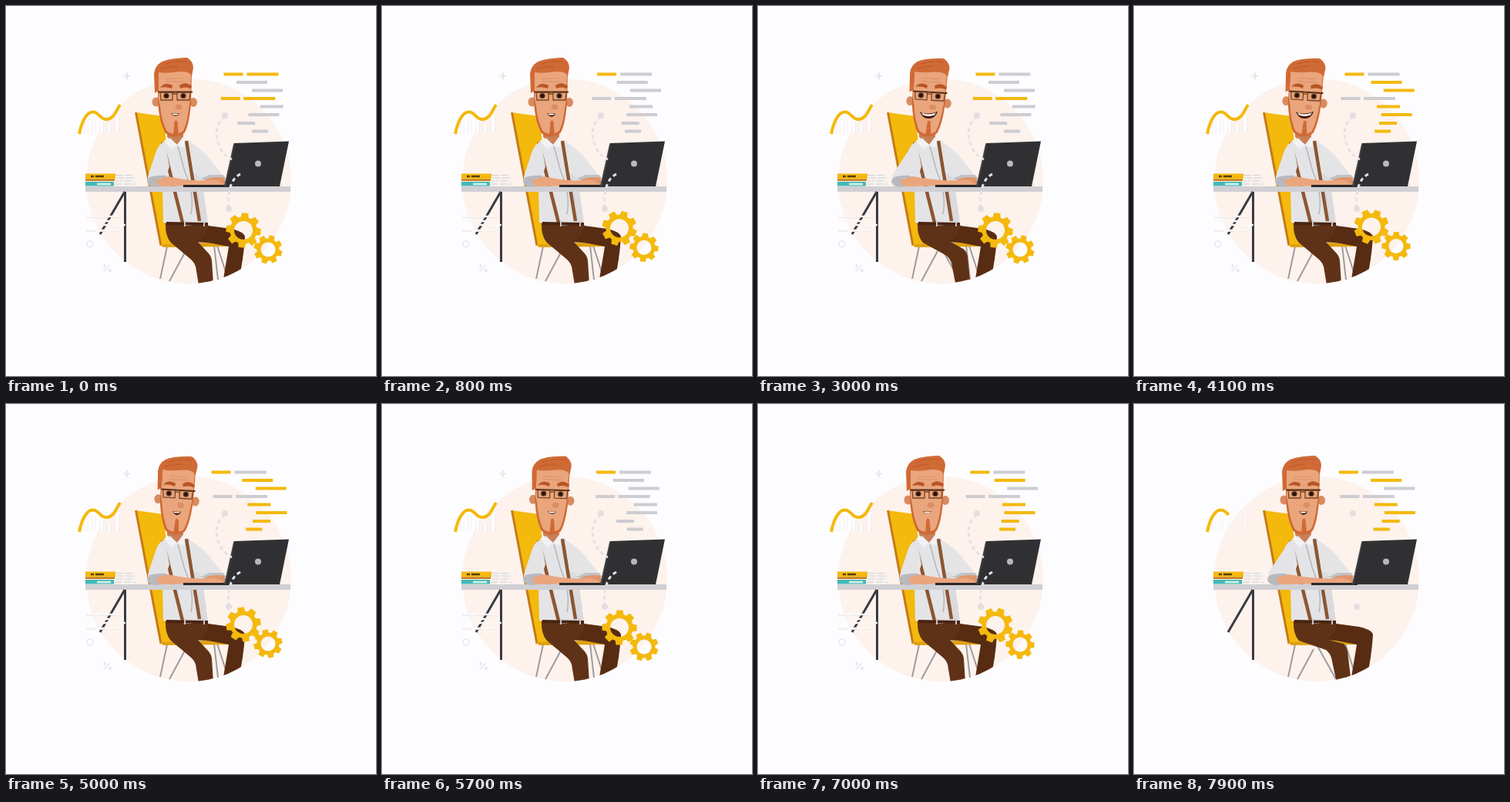
Recreate the animation shown at these times as an HTML page with a canvas. Size 480 by 480 pixels, loop 8000 ms.

```html
<!DOCTYPE html>
<html>
<head>
<meta charset="utf-8">
<style>
html, body { margin: 0; width: 100%; height: 100%; overflow: hidden; background: #fdfcff; }
canvas { display: block; }
</style>
</head>
<body>
<canvas id="stage" width="480" height="480"></canvas>
<script>
const c = document.getElementById('stage').getContext('2d');
const LOOP = 8000, CYCLE = 6000, TAU = Math.PI * 2;
const YELLOW = '#f4b90d', GRAY = '#cdccd1', SKIN = '#eaa57c', HAIR = '#d06a35',
      PANTS = '#5f3217', SHIRT = '#e4e4e7', FAINT = '#e9e6ea';

const clamp = v => Math.max(0, Math.min(1, v));
const ease = (t, a, b) => { const u = clamp((t - a) / (b - a)); return u * u * (3 - 2 * u); };

function fill(d, color) {
  c.fillStyle = color;
  c.fill(new Path2D(d));
}
function line(d, color, width, dash = []) {
  c.strokeStyle = color;
  c.lineWidth = width;
  c.setLineDash(dash);
  c.stroke(new Path2D(d));
  c.setLineDash([]);
}
function oval(x, y, rx, ry, color) {
  c.fillStyle = color;
  c.beginPath();
  c.ellipse(x, y, rx, ry, 0, 0, TAU);
  c.fill();
}
function rect(x, y, w, h, color) {
  c.fillStyle = color;
  c.fillRect(x, y, w, h);
}

// y, centre x, swing, time of the rightmost point, then pieces:
// offset, width, first colour is yellow, times of colour change
const swap = [900, 2600, 3800, 5600, 6800];
const rows = [
  [88.5, 274.8, 9.2, 280, [0, 25, 1, []], [30, 41, 1, [700, 2950, 3000, 6100, 6800]]],
  [99, 304, 5, 1480, [0, 40, 0, swap]],
  [109.5, 322, 3, 1550, [0, 40, 0, swap.slice(0, 4)]],
  [120, 272.3, 6.5, 50, [0, 25, 1, [700, 2700, 3600]], [29.5, 41, 1, [700, 2700, 3600, 6000, 6900]]],
  [130.5, 320, 10, 100, [0, 30, 0, swap]],
  [141, 319.5, 5.7, 1750, [0, 40, 0, swap]],
  [152, 312, 12, 1600, [0, 23, 0, swap]],
  [162.5, 314.5, 4.7, 100, [0, 21, 0, swap]]
];

function codeLines(t) {
  for (const [y, mid, amp, peak, ...parts] of rows) {
    const x = mid + amp * Math.cos(TAU * (t - peak) / 3000);
    for (const [dx, w, on, times] of parts) {
      const flips = times.filter(s => s <= t).length;
      rect(x + dx, y - 2, w, 4, (on + flips) % 2 ? YELLOW : GRAY);
    }
  }
}

function chair() {
  line('M209 312L200 354M233 318L212 357M238 314L262 357M270 311L275 355M274 311L286 348', '#9d9ca1', 2);
  fill('M168 138L204 143L224 312L200 309Z', YELLOW);
  line('M168.5 138L201 311', '#c57b18', 3);
  fill('M199 309L292 306L291 312L204 313Z', '#e0a011');
}

function legs(k) {
  c.save();
  c.beginPath();
  c.arc(237, 227, 133, 0, TAU);
  c.clip();
  fill('M240 282L292 289Q310 293 310 300Q308 330 301 360H281L289 312L262 307L240 306Z', '#582c12');
  const foot = 13 * k, knee = 10 * k, lift = 9 * k;
  fill(`M207 280L262 282Q264 298 248 305L${262 + knee} ${320 - lift}
    Q${266 + knee} ${324 - lift} ${267 + knee} ${330 - lift}L${269 + foot} 362H${250 + foot}
    L${246 + knee} ${338 - lift}Q${244 + knee} ${332 - lift} ${239 + knee} ${328 - lift}
    L214 307Q206 298 207 280Z`, PANTS);
  c.restore();
}

function torso() {
  fill('M209 158H230V178L220 183L209 176Z', '#c97f55');
  fill('M205 177L213 171L222 180L232 171L240 177L252 215L262 282L236 285L204 281L203 235L200 190Z', SHIRT);
  fill('M240 180L246 190L256 238L262 282L250 284L245 225Z', '#dadadf');
  fill('M209 170L222 180L215 186L205 176ZM231 168L222 180L229 184L236 175Z', '#f2f2f4');
  line('M223 182L232 215Q245 245 240 270', '#b6b7bd', 1.5);
  line('M203 177L229 281M234 175L251 279', '#8c5632', 4.5);
  line('M208 282L262 283', '#4a2410', 4);
  line('M232 279V286M257 279V286', '#c9c6c6', 2);
}

function mouth(smile, open) {
  if (smile) {
    fill('M208 138Q219 142 231 136Q228 146 219 146Q212 146 208 138Z', '#43190f');
    fill('M210 139Q219 142.5 229 137.5L227 141Q219 144.5 212 141.5Z', '#fff');
  } else {
    fill(`M214 139Q219 140.5 225 139Q224 ${142 + open} 219 ${142 + open}Q215 142 214 139Z`, '#43190f');
    fill('M215 139.4Q219 140.7 224 139.4L223 141Q219 142 216 141Z', '#fff');
  }
}

function head(tilt, smile, open) {
  c.save();
  c.translate(219, 172);
  c.rotate(tilt * 0.06);
  c.translate(-219, -172);
  oval(194.5, 124.5, 5, 6, '#d98b60');
  oval(243, 125, 5, 6, '#d98b60');
  // the jaw is one beard shape with a smaller face laid over it
  fill('M197 84H241L240 126Q238 152 232 164Q228 169 219 169.5Q210 169 206 164Q199 150 197 126Z', HAIR);
  fill('M198 84H240L239 120L237.5 130Q235 152 230 162Q226 165.5 219 166Q212 165.5 208.5 162Q202 150 200 130L198 120Z', SKIN);
  fill('M218.5 150Q220.5 147 222.5 150L224 168H217Z', HAIR);
  fill('M193 113L192 88Q193 78 201 73Q210 68 235 67Q243 72 243 80L241 91Q238 84 225 85Q207 88 198 86V110Z', HAIR);
  line('M205 76Q220 70 235 72M201 82Q212 78 222 78', '#bd5729', 1);
  line('M208 94H230M207 98H232', '#dc9169', 1);
  fill('M200 106Q206 98 216 103L215 107Q207 104 200 106ZM225 103Q233 97 241 104L240 107Q232 104 226 107Z', '#b95527');
  for (const x of [208, 230]) {
    oval(x, 116.5, 3.8, 3.6, '#74452e');
    oval(x, 116.5, 2.4, 2.6, '#26130d');
  }
  line('M200 112H216V122H201ZM222 112H239L238 122H222ZM216 114H222', '#764622', 1.3);
  line('M197 111.5H242', '#5c331a', 1.8);
  oval(224, 131, 4.5, 3.5, '#dc8d65');
  mouth(smile, open);
  c.restore();
}

function desk() {
  rect(103, 234, 266, 7, '#d0cfd4');
  line('M154.5 241V332M154 241L122 296', '#3b3b41', 3);
}

function books() {
  rect(141, 218, 27, 15, '#f6f1ee');
  line('M142 219.5H166M144 223H169M142 227H164M141 231H168', '#d8d2cd', 1, [9, 3]);
  rect(103, 217.5, 39, 7, YELLOW);
  rect(103, 224.5, 38, 2.5, '#c67c1d');
  rect(103, 228, 37, 5.5, '#43b8b5');
  line('M110 221H114M116 221H127', '#55401a', 2.5);
  line('M118 231H136', '#d8f0ee', 2.5);
}

function arms(k) {
  const e = 183 - 10 * k;
  fill('M237 176Q254 185 264 198L284 223L262 227L243 216Z', SHIRT);
  fill('M264 219L282 219L285 224L262 228L252 224Z', '#c1c2c7');
  fill('M258 225Q272 220 284 223L285 232L262 233Z', '#e0946a');
  fill(`M206 176Q199 178 195 188L${e + 2} 218Q${e - 1} 228 ${e + 5} 233L${e + 22} 234L205 230L212 208Z`, SHIRT);
  fill(`M${e + 3} 222Q${e + 16} 219 ${e + 24} 220L${e + 34} 231L${e + 12} 235Q${e} 234 ${e} 227Z`, '#b7b9be');
  fill(`M${e + 11} 226L${e + 27} 221Q240 228 260 226Q274 224 281 230V233L${e + 16} 234Z`, SKIN);
}

function laptop() {
  rect(230, 232, 60, 3, '#28282b');
  fill('M296 178L367 175.5L355 234H283Z', '#303032');
  line('M296 178.5L284 234', '#47474b', 1.5);
  oval(327, 204.5, 4, 4, '#b8b8ba');
}

function chart(p) {
  const shown = Math.min(p, 5900 - p);
  if (shown <= 0) return;
  c.globalAlpha = clamp(shown / 500);
  [152, 147, 150, 154, 142].forEach((top, i) => {
    const bar = `M${104 + i * 10} ${top}V165`;
    line(bar, '#f0edf0', 5);
    line(bar, '#fff', 3);
  });
  c.globalAlpha = 1;
  line('M95 166C98 151 104 138 112 137.5C121 137 121 147 130 147C140 147 142 137 148 128', YELLOW, 4,
    [shown * 0.24, 999]);
}

function notes(show) {
  c.globalAlpha = show;
  line('M157 86V95M152.5 90.5H161.5', FAINT, 2);
  line('M104 273H146M104 279H136M116 284H155M104 291H144', '#fbf7f6', 2.5);
  line('M104 274.5H146M104 292.5H144', FAINT, 1, [12, 4]);
  line('M105 309a4 4 0 1 0 8 0a4 4 0 1 0 -8 0M127 344L135 336', FAINT, 1.5);
  oval(128, 337, 2, 2, FAINT);
  oval(135, 343, 2, 2, FAINT);
  line('M284 144C268 152 269 187 293 199M304 218C292 224 287 240 289 263', '#e4e1e5', 3, [5, 4]);
  c.globalAlpha = 1;
}

function gear(x, y, r, hole, size, turn) {
  if (size <= 0) return;
  const body = (r * 0.78 + hole) / 2;
  c.save();
  c.translate(x, y);
  c.rotate(turn);
  c.scale(size, size);
  c.strokeStyle = YELLOW;
  c.lineWidth = r * 0.78 - hole;
  c.beginPath();
  c.arc(0, 0, body, 0, TAU);
  c.stroke();
  for (let i = 0; i < 8; i++) {
    c.rotate(TAU / 8);
    fill(`M${-r * 0.23} ${-r * 0.7}L${-r * 0.18} ${-r}H${r * 0.18}L${r * 0.23} ${-r * 0.7}Z`, YELLOW);
  }
  c.restore();
}

function draw(t) {
  const p = (t + 4300) % CYCLE;
  const lean = ease(p, 5500, 5900) + 1 - ease(p, 1100, 1500);
  const reach = ease(p, 5500, 5900) + 1 - ease(p, 1400, 1800);
  const tilt = ease(t, 2400, 2800) - ease(t, 5500, 5900);
  const smile = t >= 2600 && t < 4600;
  const talk = 0.8 + 1.2 * Math.sin(TAU * t / 600);
  const show = ease(p, 200, 800) * (1 - ease(p, 5300, 5800));
  const bob = 3 * Math.cos(TAU * (t - 100) / 3000);
  const turn = TAU / 8 * t / 3000;

  rect(0, 0, 480, 480, '#fdfcff');
  oval(237, 227, 133, 133, '#fdf2ec');
  chart(p);
  chair();
  legs(lean);
  torso();
  head(tilt, smile, talk);
  desk();
  arms(reach);
  books();
  laptop();
  notes(show);
  const dot = Math.min(4, p / 50, Math.max(0, (5900 - p) / 50));
  oval(284, 142, dot, dot, '#e3dfe1');
  oval(289, 263, dot, dot, '#e3dfe1');
  gear(308, 288 + bob, 22.5, 12, show, 0.1 + turn);
  gear(340, 313 + bob, 18.5, 9.5, show, 0.3 - turn);
  codeLines(t);
}

function tick() {
  draw(Math.floor(performance.now() % LOOP / 100) * 100);
  requestAnimationFrame(tick);
}
tick();
</script>
</body>
</html>
```
